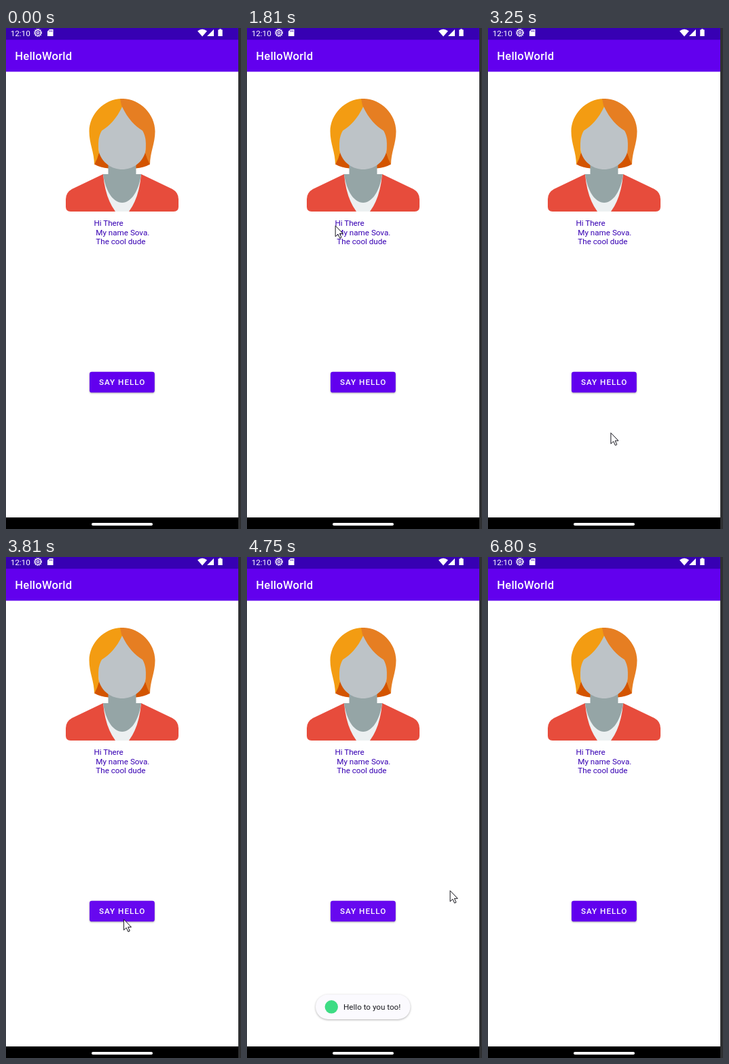
Recreate the animation shown at these times as an HTML page. Size 346 px wide and 737 px high, loop 7.54 s.

```html
<!DOCTYPE html>
<html lang="en">
<head>
<meta charset="utf-8">
<title>HelloWorld</title>
<style>
  html, body { margin: 0; width: 100%; height: 100%; overflow: hidden; background: #fff; }
  svg { display: block; width: 346px; height: 737px; }
  text { font: 400 11.65px Roboto, sans-serif; fill: #fff; }
  .title { font-size: 16.6px; font-weight: 500; letter-spacing: .0125em; }
  .body text { fill: #3700b3; }
  .label { font-weight: 500; letter-spacing: .0892em; }
  #toast text { fill: #1d1d22; }
  #toast rect { fill: #fbfafe; filter: drop-shadow(0 1px 1.5px rgba(0, 0, 0, .3)); }
</style>
</head>
<body>
<svg viewBox="0 0 346 737">
  <defs>
    <radialGradient id="glow">
      <stop offset="0" stop-color="#fff"/>
      <stop offset=".5" stop-color="#fff" stop-opacity=".85"/>
      <stop offset="1" stop-color="#fff" stop-opacity="0"/>
    </radialGradient>
    <rect id="plate" x="123" y="505.7" width="95.8" height="30.6" rx="3.4"/>
    <clipPath id="plateClip"><use href="#plate"/></clipPath>
    <!-- left half of the hair, and the darker lock under it -->
    <path id="hair" d="M174 104C146 102 122.500 126 122.500 152C122.500 170 130 183 130 201Q135 192 137 183C135 171 136 159 141 151C152 144 162 135 172 114Z"/>
    <path id="lock" d="M138 180L130 200.500Q139 205.500 151 206.500V190Z"/>
  </defs>

  <rect width="346" height="737" fill="#fff"/>
  <rect y="17" width="342" height="47.300" fill="#6200ee"/>
  <rect width="342" height="17.300" fill="#3700b3"/>

  <!-- status bar -->
  <text x="6.700" y="11.600">12:10</text>
  <g fill="none" stroke="#fff">
    <circle cx="47" cy="7" r="5.200" stroke-width="1.600" stroke-dasharray="1.500 1.220"/>
    <circle cx="47" cy="7" r="4.100" stroke-width="1.300"/>
    <circle cx="47" cy="7" r="1.600" stroke-width="1.200"/>
  </g>
  <path d="M64 2H69.500V12H61V5Z" fill="#fff"/>
  <path d="M64 3.500V5.500M65.800 3.500V5.500M67.600 3.500V5.500" stroke="#3700b3" stroke-width=".9"/>
  <path d="M282 4.600Q289 -1 296 4.600L289 12.500ZM296 12L306 2V12Z" fill="#fff"/>
  <path d="M314 1.500H317V2.600H318.700V12H312.300V2.600H314Z" fill="#fff"/>
  <text class="title" x="13.300" y="47">HelloWorld</text>

  <!-- avatar, mirrored about x = 171 -->
  <path fill="#e74c3c" d="M88 263V252Q88 242 97 237L143 215H199L245 237Q254 242 254 252V263Q254 270 247 270H95Q88 270 88 263Z"/>
  <path fill="#ecf0f1" d="M143 215H199Q196 250 181 270H161Q146 250 143 215Z"/>
  <g fill="#d35400">
    <use href="#lock"/>
    <use href="#lock" transform="matrix(-1 0 0 1 342 0)"/>
  </g>
  <path fill="#95a5a6" d="M150.500 195H191.500V215H199C196 238 185 257 171 257C157 257 146 238 143 215H150.500Z"/>
  <path fill="#bdc3c7" d="M171 112L142 146C135 156 135 172 137 183C142 199 156 208 171 208C186 208 200 199 205 183C207 172 207 156 200 146Z"/>
  <use href="#hair" fill="#f39c12"/>
  <use href="#hair" fill="#e67e22" transform="matrix(-1 0 0 1 342 0)"/>

  <g class="body">
    <text x="129.400" y="291">Hi There</text>
    <text x="132.300" y="304.700">My name Sova.</text>
    <text x="132.300" y="318.300">The cool dude</text>
  </g>

  <use id="button" href="#plate" fill="#6200ee"/>
  <g clip-path="url(#plateClip)">
    <use id="hover" href="#plate" fill="#fff"/>
    <circle id="ripple" cx="174" cy="518" fill="url(#glow)"/>
  </g>
  <text class="label" x="137" y="525.400">SAY HELLO</text>

  <g id="toast">
    <rect x="101" y="643.500" width="139.500" height="36.500" rx="18.250"/>
    <circle cx="124.300" cy="661.800" r="9.700" fill="#3ddc84"/>
    <text x="142" y="666">Hello to you too!</text>
  </g>

  <rect y="720" width="342" height="17" fill="#000"/>
  <rect x="126" y="728" width="90" height="4" rx="2" fill="#fff"/>
  <rect x="342" width="4" height="737" fill="#2f3032"/>

  <path id="cursor" d="M.5 .5V16.500L4.300 13L7 18.800L9.400 17.700L6.800 12H11.600Z" fill="#fff" stroke="#15151c" stroke-linejoin="round"/>
</svg>
<script>
const LOOP = 7540, STEP = 70;

// Each pointer move is one curve: from, bend, to.
const moves = [
  { start: 1180, end: 1880, from: [299, 420], bend: [210, 308], to: [128, 290] },
  { start: 2010, end: 2430, from: [126, 292], bend: [101, 302], to: [126, 318] },
  { start: 2630, end: 3320, from: [128, 322], bend: [214, 520], to: [178, 601] },
  { start: 3390, end: 4080, from: [178, 603], bend: [179, 570], to: [170.5, 516.5] },
  { start: 4300, end: 4750, from: [170.5, 516.5], bend: [250, 525], to: [299, 490] },
  { start: 5890, end: 6740, from: [279, 497], bend: [276, 590], to: [318, 740] }
];

const $ = id => document.getElementById(id);
const button = $('button'), hover = $('hover'), ripple = $('ripple');
const toast = $('toast'), cursor = $('cursor');

const lerp = (a, b, u) => a + (b - a) * u;
const ramp = (t, from, to) => Math.min(1, Math.max(0, (t - from) / (to - from)));
const pulse = (t, rise, top, fall, end) => ramp(t, rise, top) - ramp(t, fall, end);
const easeOut = u => 1 - (1 - u) ** 2;

function placeCursor(t) {
  const move = moves.filter(m => m.start <= t).pop();
  cursor.style.display = move && t < 6740 ? '' : 'none';
  if (!move) return;
  const { start, end, from, bend, to } = move;
  const stepped = start + Math.floor((t - start) / STEP + .02) * STEP;
  const u = easeOut(ramp(stepped, start, end));
  const [x, y] = from.map((a, i) => lerp(lerp(a, bend[i], u), lerp(bend[i], to[i], u), u));
  cursor.setAttribute('transform', `translate(${x} ${y})`);
}

function render(t) {
  placeCursor(t);

  hover.style.opacity = .03 * pulse(t, 3600, 3700, 4750, 4890);
  ripple.setAttribute('r', lerp(20, 90, ramp(t, 4150, 4375)));
  ripple.style.opacity = .22 * pulse(t, 4080, 4150, 4375, 4675);

  const lift = pulse(t, 4080, 4220, 4375, 4600);
  button.style.filter =
    `drop-shadow(0 ${lerp(1, 4.5, lift)}px ${lerp(1.2, 4, lift)}px rgba(0, 0, 0, .33))`;

  toast.style.opacity = pulse(t, 4370, 4530, 6550, 6800);
}

const began = performance.now();
function tick() {
  render((performance.now() - began) % LOOP);
  requestAnimationFrame(tick);
}
tick();
</script>
</body>
</html>
```
